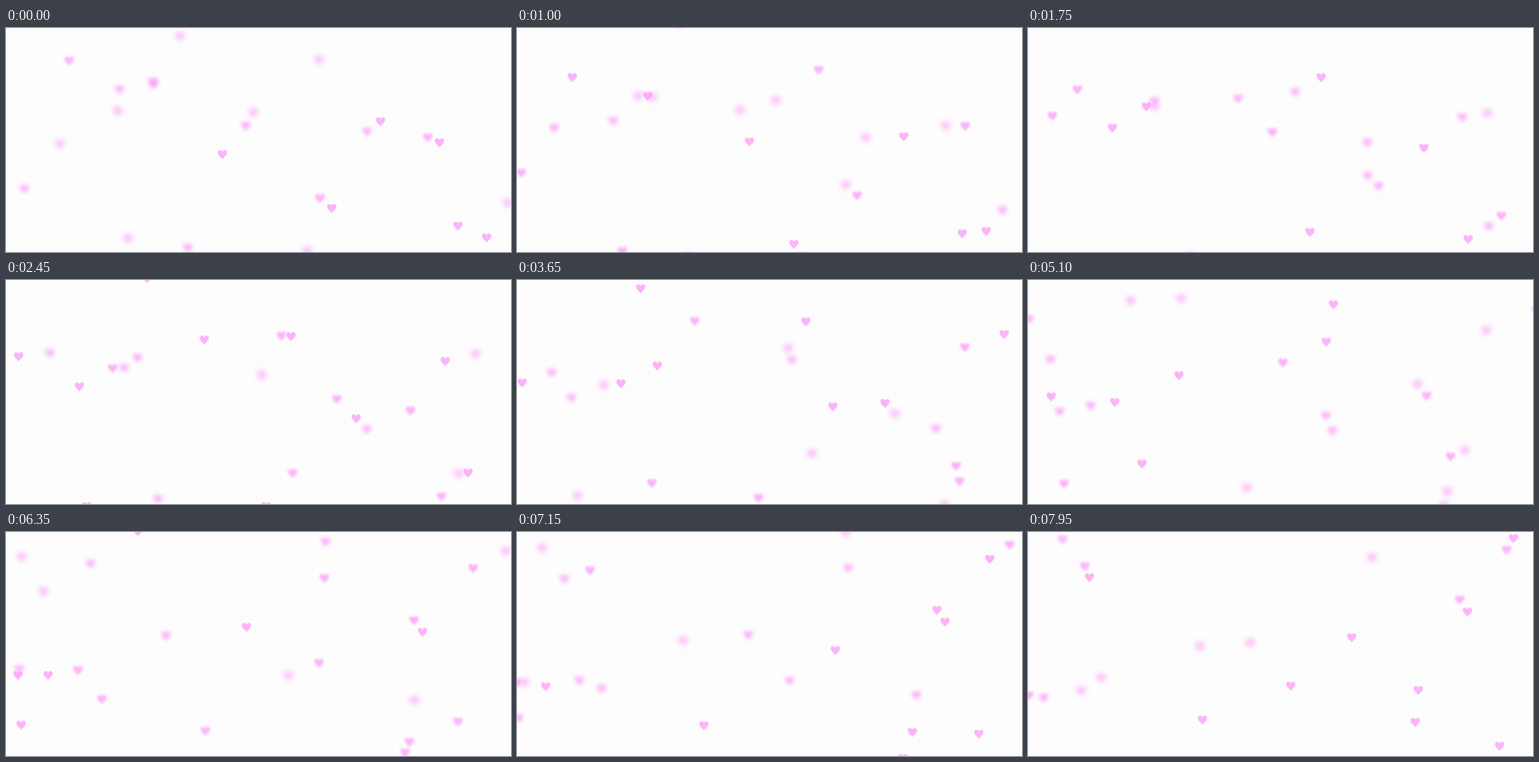
These frames come from a looping animation (600 px wide and 266 px high, 8 s). An HTML page with a canvas:

```html
<!DOCTYPE html>
<html lang="en">
<head>
<meta charset="utf-8">
<title>Drifting hearts</title>
<style>
  html, body { margin: 0; width: 100%; height: 100%; overflow: hidden; background: #fdfdfd; }
  canvas { display: block; width: 600px; height: 266px; }
</style>
</head>
<body>
<canvas id="stage" width="600" height="266"></canvas>
<script>
const LOOP = 8000, STEP = 50;
const WALL = { left: -15, right: 606, top: -12, bottom: 276 };
const MAX_BLUR = 3.4, LEVELS = 12, SIZE = 40;

// Blur period in seconds -> hearts: x, y, vx, vy (px/s), time of strongest blur,
// and the velocity after meeting a wall (without one the heart drifts out).
const HEARTS = {
  4: [
    [75, 39, -9.3, 19.5, 3],
    [133, 99, -18.7, 11.2, 4.3],
    [145, 250, -20, 14.9, 4, [-20, -10.2]],
    [285, 116, -20.2, -18.4, .9],
    [372, 38, -13.6, 11.8, -.1],
    [501, 130, 8.5, -13.7, 1],
    [515, 136, 17.5, -19.6, 2.2, [-10.6, -9.7]],
    [373, 202, 17.6, -15.3, 1.05],
    [571, 249, -13.5, -7.7, 2.4]
  ],
  5: [
    [207, 10, -15.4, -14.7, .5, [-17.2, 10.2]],
    [175, 64, -19.7, 16.7, 4.1],
    [257, 150, 19.1, -15, 3],
    [429, 123, -14.7, 7.5, 1.1],
    [358, 265, -20.8, 7, 4.9, [-18.5, -8.3]],
    [596, 208, -19.2, 8.5, 5.1]
  ],
  7: [
    [175, 67, -14.1, 15.3, 1.2],
    [135, 73, 8.7, 7.9, .9],
    [64, 138, -20, -19.3, 6.5, [14, -13.3]],
    [22, 191, -17, -18.9, 6.1, [14.3, -18.9]],
    [216, 261, -12.5, 10.4, 1.3, [-17.1, -15.8]],
    [294, 100.5, 13.5, -14, .7],
    [445, 111, 14.5, 18, 4.5],
    [387, 214, 17, -15, 3.4],
    [537, 235, -8, 9, 4.4, [-11.9, -14.8]],
    [321, 275.5, 8, -18.9, 4.2]
  ]
};

const ctx = document.getElementById('stage').getContext('2d');
const shape = new Path2D(
  'M0 6 C-1.4 3.4 -5.5 1.2 -5.5 -2 C-5.5 -5.7 -1.1 -6.2 0 -2.7 ' +
  'C1.1 -6.2 5.5 -5.7 5.5 -2 C5.5 1.2 1.4 3.4 0 6Z');

// One small heart image per blur level, drawn once.
const sprites = Array.from({ length: LEVELS + 1 }, (_, level) => {
  const canvas = document.createElement('canvas');
  canvas.width = canvas.height = SIZE;
  const pen = canvas.getContext('2d');
  if (level) pen.filter = `blur(${MAX_BLUR * level / LEVELS}px)`;
  pen.fillStyle = 'rgba(252, 130, 248, .6)';
  pen.translate(SIZE / 2, SIZE / 2);
  pen.fill(shape);
  return canvas;
});

function hitTime(x, y, vx, vy) {
  return Math.min(
    ((vx < 0 ? WALL.left : WALL.right) - x) / vx,
    ((vy < 0 ? WALL.top : WALL.bottom) - y) / vy);
}

function place([x, y, vx, vy, , rebound], t) {
  const hit = rebound ? hitTime(x, y, vx, vy) : Infinity;
  const before = Math.min(t, hit), after = t - before;
  const [bx, by] = rebound || [0, 0];
  return [x + vx * before + bx * after, y + vy * before + by * after];
}

function drawHeart(heart, period, t) {
  const [x, y] = place(heart, t);
  const softness = (1 + Math.cos(2 * Math.PI * (t - heart[4]) / period)) / 2;
  ctx.drawImage(sprites[Math.round(softness * LEVELS)], x - SIZE / 2, y - SIZE / 2);
}

function draw(t) {
  ctx.fillStyle = '#fdfdfd';
  ctx.fillRect(0, 0, 600, 266);
  for (const [period, hearts] of Object.entries(HEARTS))
    for (const heart of hearts) drawHeart(heart, +period, t);
}

const start = performance.now();
let shown = -1;
function tick() {
  const step = Math.floor((performance.now() - start) % LOOP / STEP);
  if (step !== shown) {
    shown = step;
    draw(step * STEP / 1000);
  }
  requestAnimationFrame(tick);
}
tick();
</script>
</body>
</html>
```
